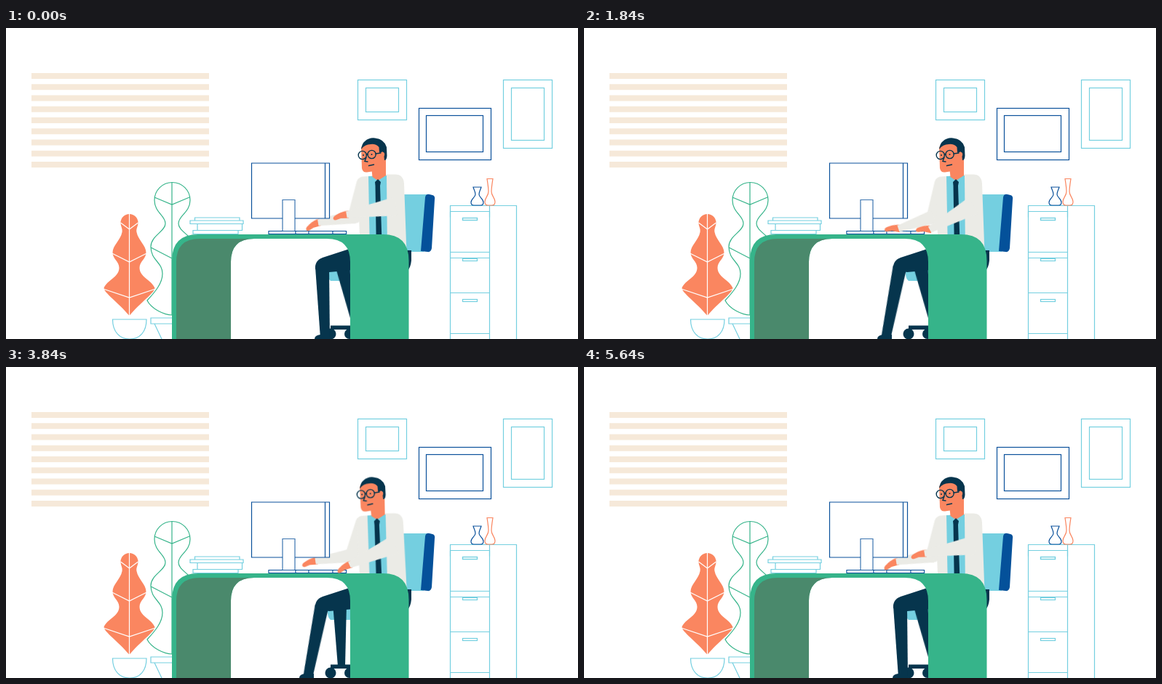
These frames come from a looping animation (786 by 428 pixels, 5680 ms). An HTML page without scripts:

```html
<!DOCTYPE html>
<html lang="en">
<head>
<meta charset="utf-8">
<title>Office desk</title>
<style>
html, body { margin: 0; width: 100%; height: 100%; overflow: hidden; background: #fff; }
svg { display: block; width: 100vw; height: 100vh; }
.line { fill: none; stroke-width: 1.2; }
.paper { fill: #fff; stroke-width: 1.2; }
.sky { stroke: #74cfe0; }
.blue { stroke: #0a519b; }
.leaf { stroke: #36b48a; }
.coral { stroke: #fa8660; }
.skin { fill: #fa8660; }
.ink { fill: #06354d; }
.coat { fill: #ebebe6; }
.pen { fill: none; stroke: #06354d; stroke-width: 1.4; stroke-linecap: round; }

/* typing: a steady beat, gated off while he thinks */
@property --gate { syntax: "<number>"; inherits: true; initial-value: 1; }
@property --beat { syntax: "<number>"; inherits: true; initial-value: 0; }
.man { animation: gate 5.68s linear infinite, beat .71s ease-in-out infinite; }
.tap { transform: rotate(calc(var(--gate) * var(--beat) * var(--dir) * 1deg)); }
@keyframes gate { 0%, 25%, 68%, 100% { --gate: 1; } 32%, 63% { --gate: 0; } }
@keyframes beat { 0%, 50%, 100% { --beat: 0; } 25% { --beat: 2.2; } 75% { --beat: -1.6; } }

.body, .upper, .fore, .palm, .near, .nearPalm, .shin, .shoe, .backLeg {
  animation: 5.68s ease-in-out infinite;
}
.body { transform-origin: 520px 290px; animation-name: lean; }
.upper { animation-name: upper; }
.fore { animation-name: fore; }
.palm { animation-name: palm; }
.near { animation-name: near; }
.nearPalm { animation-name: nearPalm; }
.shin { transform-origin: 434px 327px; animation-name: shin; }
.shoe { animation-name: shoe; }
.backLeg { transform-origin: 462px 310px; animation-name: backLeg; }

@keyframes lean {
  0%, 32.4%, 53.3%, 99.3%, 100% { transform: rotate(0deg); }
  11%, 20%, 67%, 84% { transform: rotate(-.9deg); }
}
@keyframes upper {
  0%, 21%, 99.3%, 100% { transform: rotate(104.6deg); }
  32.4%, 34%, 78%, 82% { transform: rotate(103.2deg); }
  49%, 54% { transform: rotate(171deg); }
  67.6% { transform: rotate(108deg); }
}
@keyframes fore {
  0%, 21%, 99.3%, 100% { transform: rotate(66deg); }
  32.4%, 34%, 78%, 82% { transform: rotate(58deg); }
  49%, 54% { transform: rotate(142deg); }
  67.6% { transform: rotate(63.6deg); }
}
@keyframes palm {
  0%, 21%, 99.3%, 100% { transform: rotate(-6deg); }
  32.4%, 34%, 78%, 82% { transform: rotate(29deg); }
  49%, 54% { transform: rotate(13deg); }
  67.6% { transform: rotate(5deg); }
}
@keyframes near {
  0%, 99.3%, 100% { transform: rotate(170.4deg); }
  12.7%, 20% { transform: rotate(166deg); }
  31%, 58%, 78%, 82% { transform: rotate(151deg); }
  67.6% { transform: rotate(157.4deg); }
}
@keyframes nearPalm {
  0%, 20%, 67.6%, 99.3%, 100% { transform: rotate(8deg); }
  31%, 58%, 78%, 82% { transform: rotate(41deg); }
}
@keyframes shin {
  0%, 13%, 99%, 100% { transform: rotate(0deg); }
  27%, 85% { transform: rotate(13.5deg); }
}
@keyframes shoe {
  0%, 13%, 99%, 100% { transform: translateX(0); }
  27%, 85% { transform: translateX(-21px); }
}
@keyframes backLeg {
  0%, 54%, 99%, 100% { transform: rotate(-11.5deg); }
  67%, 85% { transform: rotate(0deg); }
}
</style>
</head>
<body>
<svg viewBox="0 0 786 428" preserveAspectRatio="none">
  <defs>
    <path id="hand" class="skin" d="M-2 5C6 5 12 2 18-2C21-5 19-8 15-7L9-5L-2-5Z"/>
    <g id="drawer">
      <path d="M0 8V0H54V8M0 64H54"/>
      <rect x="17" y="9" width="20" height="3"/>
    </g>
    <path id="halfLeaf" d="M0 0A12 12 0 0 1 12 12C12 17 9 20 10 25C12 36 23 43 23 53C23 62 14 65 14 74C14 87 31 91 35 102C35 108 15 122 0 140Z"/>
    <path id="rib" d="M-1-1L0 0L1-1" vector-effect="non-scaling-stroke"/>
  </defs>

  <!-- wall -->
  <path d="M157 62V192" stroke="#f6e9d9" stroke-width="244" stroke-dasharray="8 7.25"/>
  <g class="line" transform="translate(.5 .5)">
    <g class="sky">
      <rect x="483" y="71" width="67" height="55"/>
      <rect x="494" y="82" width="45" height="33"/>
      <rect x="683" y="71" width="67" height="94"/>
      <rect x="694" y="82" width="45" height="72"/>
    </g>
    <g class="blue">
      <rect x="567" y="110" width="99" height="71"/>
      <rect x="577" y="120" width="78" height="50"/>
    </g>
  </g>

  <!-- cabinet -->
  <g class="line sky" transform="translate(610.5 252.500)">
    <path d="M0 180V-8H91V180M54-8V180M0 168H54"/>
    <use href="#drawer" height="56"/>
    <path d="M0 56H54M0 112H54"/>
    <rect x="17" y="9" width="20" height="3"/>
    <rect x="17" y="65" width="20" height="3"/>
    <rect x="17" y="121" width="20" height="3"/>
  </g>
  <path class="line blue" d="M642 219H653C652 223 650 225 650 229C650 233 656 235 656 240Q656 244 652 244H643Q639 244 639 240C639 235 645 233 645 229C645 225 643 223 642 219Z"/>
  <path class="line coral" d="M661 207.500H669C668 214 667 220 667 225C667 231 672 234 672 239Q672 244 668 244H662Q658 244 658 239C658 234 663 231 663 225C663 220 662 214 661 207.500Z"/>

  <!-- plants -->
  <g class="line leaf">
    <path d="M228 395C218 395 200 387 194 375C204 364 215 352 215 338C215 322 199 320 199 301C199 286 219 280 219 269C219 258 204 254 204 237A24.500 24.500 0 0 1 253 237C253 254 237 258 237 269C237 276 245 281 251 287"/>
    <path d="M228 212V395M204 233L228 243L252 233M199 302L228 317"/>
  </g>
  <path class="line sky" d="M230 399H199V407H230M204 407L214 428"/>
  <g transform="translate(169.500 256)">
    <use href="#halfLeaf" class="skin"/>
    <use href="#halfLeaf" class="skin" transform="scale(-1 1)"/>
    <g class="line" stroke="#fff">
      <path d="M0 0V140"/>
      <use href="#rib" transform="translate(0 21) scale(12 9)"/>
      <use href="#rib" transform="translate(0 66) scale(24 12)"/>
      <use href="#rib" transform="translate(0 115) scale(36 12)"/>
    </g>
  </g>
  <path class="line sky" d="M146.500 401H193C193 418 184 428 170 428S146.500 418 146.500 401Z"/>

  <!-- chair and legs -->
  <path fill="#74cfe0" d="M540 229H580L574 308H540Z"/>
  <path fill="#04519a" d="M576 233Q577 228 582 229L586 230Q590 231 589 236L585 303Q584 309 579 308L570 307Z"/>
  <path class="ink" d="M545 306H557V320Q556 330 551 335H545Z"/>
  <path fill="#74cfe0" d="M442 332H480V348H446Q442 345 442 338Z"/>
  <g class="ink">
    <path d="M446 409.500H480V415H446Z"/>
    <circle cx="446" cy="421" r="7.500"/>
    <circle cx="472" cy="421" r="7"/>
    <path class="backLeg" d="M449 325L456 412H466L468 325Z"/>
    <path class="shin" d="M425 329L432 427H445L444 330Z"/>
    <path d="M478 302L435 316Q424 320 425 332L444 336L478 333Z"/>
    <path class="shoe" d="M432 422Q424 423 424 428H444V422Z"/>
  </g>

  <path class="paper blue" d="M361 279.500H467.500V283.500H361ZM398 279.500V283.500M416 279.500V283.500M449 279.500V283.500"/>

  <!-- man -->
  <g class="man">
    <g class="body">
      <g transform="translate(491 214)">
        <g class="tap" style="--dir: 1"><g class="upper">
          <path d="M0 0H47" stroke="#ebebe6" stroke-width="19" stroke-linecap="round"/>
          <g transform="translate(47 0)"><g class="fore">
            <g transform="translate(50 0)"><use href="#hand" class="palm"/></g>
            <path class="coat" d="M0-9.500L51-4.500V4.500L0 9.500Z"/>
          </g></g>
        </g></g>
      </g>
      <path class="coat" d="M500 204Q485 203 483 212L487 310H550.500L547 214Q546 201.500 535 201.500H522Z"/>
      <path fill="#74cfe0" d="M498 204L523 203L524 310H500Z"/>
      <path class="skin" d="M502 190L503.500 205L511 210L522 203V178Z"/>
      <path class="ink" d="M511 208L515 212L514 217L517 310H509L507.500 217L507 212Z"/>
      <path class="skin" d="M488 164L489 193Q490 199 496 198.500L506 197Q519 192 521 180L520 160L503 154Z"/>
      <path class="ink" d="M488 167Q489 159 493 156Q499 150.500 507 151.500Q520 153 523 164L523.500 176Q523 182 520 182L519 172Q517 168 515 173L513 171L512.500 164Q508 159 501 160Q493 160 488 167Z"/>
      <circle class="skin" cx="517" cy="174" r="3.200"/>
      <g class="pen">
        <circle cx="489.800" cy="175" r="5.600"/>
        <circle cx="502.600" cy="174" r="5.600"/>
        <path d="M495.300 174H497M508 173L515 172M495 178L493 183.500L497 184M498.500 189.500L505.500 188"/>
      </g>
      <circle class="ink" cx="491" cy="175" r="1"/>
      <circle class="ink" cx="502.500" cy="174" r="1"/>
      <g transform="translate(532 246)">
        <g class="tap" style="--dir: -1"><g class="near">
          <g transform="translate(64 0)"><use href="#hand" class="nearPalm"/></g>
          <path class="coat" d="M-4-13L65-4.500V4.500L-4 13Z"/>
        </g></g>
      </g>
    </g>
  </g>

  <!-- monitor and books -->
  <path class="paper blue" d="M337.500 186H444.500V262H337.500ZM438.500 186V262"/>
  <path class="paper blue" stroke-opacity=".8" d="M380 236.500H397V279.500H380Z"/>
  <path class="paper sky" d="M259.500 261H321V265H259.500ZM253 265H326V269.500H253ZM263 269.500H324.500V278.500H263ZM257 278.500H319V283.500H257Z"/>

  <!-- desk -->
  <path fill="#36b48a" d="M228 428V320Q228 284 264 284H518Q553.500 284 553.500 320V428H473V322Q473 290 441 290H341Q309 290 309 322V428Z"/>
  <path fill="#4a896c" d="M234 428V322Q234 290 266 290H341Q309 290 309 322V428Z"/>
</svg>
</body>
</html>
```
